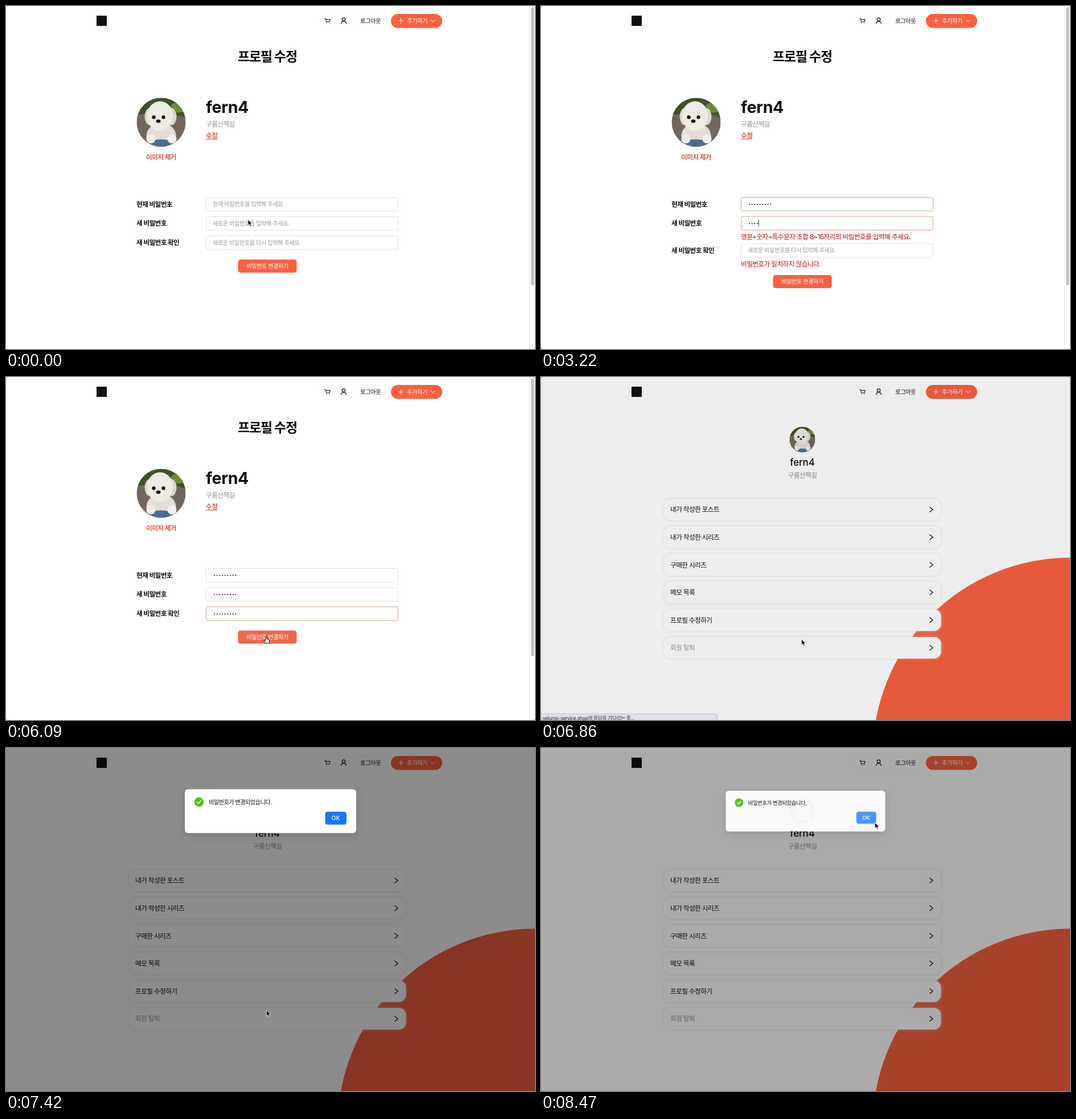
Write an HTML page that moves like this. It is 929x603 px and loops after 8540 ms.

```html
<!DOCTYPE html>
<html lang="ko">
<head>
<meta charset="utf-8">
<title>프로필 수정</title>
<style>
  html, body { margin: 0; width: 100%; height: 100%; overflow: hidden; background: #fff; }
  svg { display: block; width: 100%; height: 100%; }
  text { font-family: Inter, "Noto Sans CJK KR", "Noto Sans CJK", sans-serif; letter-spacing: -.05em; white-space: pre; }
  .latin { letter-spacing: -.01em; }
  .line { fill: none; stroke: #111; stroke-linecap: round; stroke-linejoin: round; }
  .soft { fill: #fff; stroke: #000; stroke-opacity: .035; }
</style>
</head>
<body>
<svg viewBox="0 0 929 603">
  <defs>
    <clipPath id="round"><circle r="43"/></clipPath>
    <filter id="halo" x="-5%" y="-30%" width="110%" height="160%">
      <feDropShadow dx="0" dy="0" stdDeviation="2.4" flood-color="#d6d6d6" flood-opacity=".75"/>
    </filter>
    <filter id="lift" x="-15%" y="-50%" width="130%" height="220%">
      <feDropShadow dx="0" dy="5" stdDeviation="8" flood-opacity=".13"/>
    </filter>
    <g id="avatar" clip-path="url(#round)">
      <rect x="-43" y="-43" width="86" height="86" fill="#71675f"/>
      <path d="M-43-43h86V-8Q0-24-43-12z" fill="#3f5228"/>
      <ellipse cx="30" cy="-26" rx="14" ry="9" fill="#6f8a3c"/>
      <ellipse cy="24" rx="26" ry="23" fill="#e3ddd6"/>
      <ellipse cx="-20" cy="-10" rx="9" ry="15" fill="#ddd5cc"/>
      <ellipse cx="18" cy="-10" rx="9" ry="15" fill="#ddd5cc"/>
      <ellipse cx="-2" cy="-11" rx="23" ry="26" fill="#eeeae4"/>
      <circle cx="-13" cy="-9" r="3.2" fill="#1c1917"/>
      <circle cx="4" cy="-9" r="3.2" fill="#1c1917"/>
      <ellipse cx="-5" cy="-2" rx="4" ry="3" fill="#1c1917"/>
      <ellipse cx="-1" cy="42" rx="31" ry="12" fill="#4d6c93"/>
      <circle cx="-18" cy="29" r="8" fill="#f1ede8"/>
      <circle cx="19" cy="29" r="8" fill="#f1ede8"/>
    </g>
  </defs>

  <rect width="929" height="603" fill="#fff"/>
  <g id="edit"></g>
  <g id="menu"></g>
  <g id="header"></g>
  <rect id="mask" width="929" height="603"/>
  <g id="modal"></g>
  <g id="status"></g>
  <path d="M0 0h929v603H0zM2.500A2.5 2.5 0 0 0 0 2.5" fill="none"/>
  <path d="M0 0h2Q0 0 0 2zM929 0v2q0-2-2-2zM929 603h-2q2 0 2-2zM0 603v-2q0 2 2 2z" fill="#444"/>
  <g id="cursor">
    <path id="arrow" d="M0 0v10.200l2.400-2.100 1.700 4 1.800-.8-1.700-3.900h3.100z" fill="#000" stroke="#fff" stroke-width=".8"/>
    <path id="beam" class="line" d="M-2-5.500q2 0 2 1.500v8q0 1.500-2 1.500M2-5.500q-2 0-2 1.500M2 5.500q-2 0-2-1.500" stroke-width=".9"/>
    <path id="hand" d="M-1.500-4c0-1.500 2-1.500 2 0v3.500l3 .6q1.700.4 1.500 2.200L4.300 7H-1.600L-4.300 2.800q-.6-1.400.8-1.400l2 1.400z" fill="#fff" stroke="#000" stroke-width=".9" stroke-linejoin="round"/>
  </g>
</svg>

<script>
const LOOP = 8540, STEP = 70;
const ORANGE = '#f9603f', LINK = '#dc573b', ACTIVE = '#e8998c', IDLE = '#dedede';
const $ = id => document.getElementById(id);

// Text placed by its vertical centre
const text = (x, cy, size, str, o = {}) =>
  `<text x="${x}" y="${cy + size * .37}" font-size="${size}" fill="${o.fill || '#0c0c0c'}" font-weight="${o.weight || 400}"
    text-anchor="${o.anchor || 'start'}" class="${o.cls || ''}" ${o.extra || ''}>${str}</text>`;
const box = (x, y, w, h, r, attrs) =>
  `<rect x="${x}" y="${y}" width="${w}" height="${h}" rx="${r}" ${attrs}/>`;
const mid = { anchor: 'middle' };

$('header').innerHTML =
  '<rect x="159" y="17" width="18" height="18" fill="#111"/>' +
  '<circle cx="564" cy="26" r="12" class="soft"/><circle cx="593" cy="26" r="12" class="soft"/>' +
  box(610.5, 14, 59.5, 24, 12, 'class="soft"') +
  `<path class="line" stroke-width="1.100" d="M559.500 22h1.700l1.400 6h5.400l1.200-4.500h-7M563 30.300h.1M567.700 30.300h.1"/>
   <circle class="line" stroke-width="1.200" cx="593" cy="23.600" r="2.700"/>
   <path class="line" stroke-width="1.200" d="M588.500 31c.5-5.500 8.500-5.500 9 0"/>` +
  text(622, 26, 10.4, '로그아웃') +
  box(676, 14, 90, 24.5, 12.2, `fill="${ORANGE}"`) +
  '<path class="line" style="stroke:#fff" d="M689.500 26h8M693.500 22v8M746 24.300l3.700 3.700 3.700-3.700"/>' +
  text(704, 26, 10.4, '추가하기', { fill: '#fff', weight: 500 });

const rows = [
  { label: '현재 비밀번호', hint: '현재 비밀번호를 입력해 주세요.', y: 348.3 },
  { label: '새 비밀번호', hint: '새로운 비밀번호를 입력해 주세요.', y: 382 },
  { label: '새 비밀번호 확인', hint: '새로운 비밀번호를 다시 입력해 주세요.', y: 416 }
];
const field = (r, i) => `<g id="row${i}">` +
  text(229, r.y, 11.65, r.label, { weight: 700 }) +
  box(351.5, r.y - 12, 337, 24, 3.5, `id="box${i}" fill="#fff"`) +
  text(363, r.y, 10.25, r.hint, { fill: '#9b9b9b', extra: `id="hint${i}"` }) +
  `<path id="dots${i}" fill="none" stroke="#111" stroke-width="2" stroke-linecap="round" stroke-dasharray="0 4.650"/>
   <path id="caret${i}" stroke="#111" stroke-width=".9"/></g>`;

$('edit').innerHTML =
  text(459, 89, 22.9, '프로필 수정', { ...mid, weight: 700 }) +
  '<use href="#avatar" x="272.500" y="204.500"/>' +
  text(272.5, 266, 11.65, '이미지 제거', { ...mid, fill: LINK, weight: 700 }) +
  text(351, 177.5, 28.5, 'fern4', { weight: 700, cls: 'latin' }) +
  text(351, 208, 11.65, '구름산책길', { fill: '#8f8f8f' }) +
  text(351, 228, 11.65, '수정', { fill: LINK, weight: 700, extra: 'text-decoration="underline"' }) +
  rows.map(field).join('') +
  text(351, 405.7, 11.65, '영문+숫자+특수문자 조합 8~16자리의 비밀번호를 입력해 주세요.', { fill: '#c40808', extra: 'id="badFormat"' }) +
  text(351, 440, 11.65, '비밀번호가 일치하지 않습니다.', { fill: '#c40808', extra: 'id="mismatch"' }) +
  '<g id="submit">' + box(407.5, 445.7, 103, 23, 4.5, 'id="submitBox"') +
  text(459, 457, 10.2, '비밀번호 변경하기', { ...mid, fill: '#fff', weight: 500 }) + '</g>' +
  '<path d="M919.500 0v603" stroke="#e9e9e9"/>' + box(922, 2, 5.5, 489, 2.75, 'fill="#c1c1c1"');

const items = ['내가 작성한 포스트', '내가 작성한 시리즈', '구매한 시리즈', '메모 목록', '프로필 수정하기', '회원 탈퇴'];
$('menu').innerHTML =
  `<circle cx="930" cy="665" r="347.500" fill="${ORANGE}"/>` +
  '<use href="#avatar" transform="translate(459 110) scale(.525)"/>' +
  text(459, 149.7, 17, 'fern4', { ...mid, weight: 500, cls: 'latin' }) +
  text(459, 173, 11.65, '구름산책길', { ...mid, fill: '#8f8f8f' }) +
  items.map((name, i) => {
    const y = 233 + i * 48.6;
    return box(215.5, y - 19, 487, 38, 12.5, 'fill="#fff" filter="url(#halo)"') +
      text(227, y, 11.65, name, { weight: 500, fill: i === 5 ? '#969696' : '#0c0c0c' }) +
      `<path class="line" stroke-width="1.300" d="M682.800 ${y - 4.3}l5.400 4.300-5.400 4.300"/>`;
  }).join('');

$('modal').innerHTML =
  box(314, 72.5, 301, 77, 6, 'fill="#fff" filter="url(#lift)"') +
  '<circle cx="339" cy="95" r="8.200" fill="#52c41a"/>' +
  '<path class="line" style="stroke:#fff" stroke-width="1.500" d="M335.800 95.200l2.300 2.400 4-5"/>' +
  text(356, 95, 10.15, '비밀번호가 변경되었습니다.') +
  box(560.5, 112, 37.5, 22.8, 4.4, 'id="ok"') +
  text(579, 123.3, 10.3, 'OK', { ...mid, fill: '#fff', weight: 500, cls: 'latin' });

$('status').innerHTML =
  box(-5, 592, 314, 20, 2.5, 'fill="#dfe1ea" stroke="#aaa" stroke-opacity=".7" stroke-width=".8"') +
  text(3, 600, 8.8, 'velumo-service.shop의 응답을 기다리는 중...', { fill: '#333' });

// Character count over time, per field: [time, count]
const typed = [
  [[840, 0], ...Array.from({ length: 9 }, (_, i) => [910 + i * STEP, i + 1])],
  [[1680, 0], [1750, 1], [1820, 2], [1890, 3], [1960, 4], [2030, 5], [2100, 6], [2380, 7], [2450, 8], [2520, 9],
   [3010, 7], [3080, 6], [3220, 4], [3430, 5], [3500, 7], [3640, 8], [3710, 9]],
  [[4130, 0], [4200, 1], [4340, 2], [4480, 3], [4620, 4], [4760, 5], [4900, 6], [5110, 7], [5180, 8], [5320, 9]]
];
const maskTrack = [[6790, 0], [6860, .07], [6930, .23], [7000, .37], [7140, .43], [7280, .45], [8260, .45], [8330, .44], [8400, .4], [8470, .33]];
const scaleTrack = [[6860, .2], [6930, .8], [7000, .956], [7070, 1], [8330, 1], [8400, .98], [8470, .93]];
const fadeTrack = [[6860, 0], [6930, .6], [7000, .95], [7070, 1], [8330, 1], [8470, .95]];

const smooth = k => k * k * (3 - 2 * k);
const same = k => k;
function at(track, t, ease = same) {
  const n = track.findIndex(p => p[0] > t);
  if (n < 0) return track[track.length - 1][1];
  if (n === 0) return track[0][1];
  const [t0, a] = track[n - 1], [t1, b] = track[n];
  return a + (b - a) * ease((t - t0) / (t1 - t0));
}
const lastKey = (keys, t) => keys.filter(k => k[0] <= t).pop();
const show = (id, on) => $(id).setAttribute('display', on ? 'inline' : 'none');
const shift = (id, y) => $(id).setAttribute('transform', `translate(0 ${y})`);

const xTrack = [[0, 425], [490, 432], [630, 432], [700, 433], [5530, 433], [6020, 457.5], [7420, 457.5], [8260, 586.5]];
const yTrack = [[0, 375.5], [490, 357], [630, 357], [700, 356], [5530, 356], [6020, 461], [7420, 461], [8260, 131]];

function drawForm(t, pointerY) {
  const focus = t < 840 ? -1 : t < 1680 ? 0 : t < 4130 ? 1 : 2;
  const counts = typed.map(keys => (lastKey(keys, t) || [0, 0])[1]);
  rows.forEach((r, i) => {
    const n = counts[i], x = 363.7 + n * 4.65;
    const hover = t > 0 && Math.abs(pointerY - r.y) < 12;
    $('box' + i).setAttribute('stroke', focus === i || hover ? ACTIVE : IDLE);
    show('hint' + i, !n);
    show('dots' + i, n);
    $('dots' + i).setAttribute('d', `M366 ${r.y + .5}h${Math.max(0, n - 1) * 4.65 + .1}`);
    $('caret' + i).setAttribute('d', `M${x} ${r.y - 5.5}v11`);
    show('caret' + i, focus === i && (t - lastKey(typed[i], t)[0]) % 1000 < 500);
  });
  const badFormat = counts[1] > 0 && counts[1] < 8;
  const mismatch = t >= 2450 && t < 5320;
  const down = badFormat ? 13.7 : 0;
  show('badFormat', badFormat);
  show('mismatch', mismatch);
  shift('row2', down);
  shift('mismatch', down);
  shift('submit', down + (mismatch ? 13.7 : 0));
  $('submitBox').setAttribute('fill', pointerY > 446 ? '#ee684d' : ORANGE);
}

function drawCursor(t, x, y, editing) {
  const overField = editing && t > 0 && rows.some(r => Math.abs(y - r.y) < 12);
  const overButton = editing && y > 446;
  $('cursor').setAttribute('transform', `translate(${x} ${y})`);
  show('cursor', t < 840 || t >= 5600);
  show('beam', overField);
  show('hand', overButton);
  show('arrow', !overField && !overButton);
}

function render(t) {
  const editing = t < 6510;
  const x = at(xTrack, t, smooth), y = at(yTrack, t, smooth);
  show('edit', editing);
  show('menu', !editing);
  if (editing) drawForm(t, y);
  drawCursor(t, x, y, editing);

  $('mask').setAttribute('opacity', at(maskTrack, t));
  const fade = at(fadeTrack, t), s = at(scaleTrack, t);
  show('modal', fade > 0);
  $('modal').setAttribute('opacity', fade);
  $('modal').setAttribute('transform', `translate(464.5 111) scale(${s}) translate(-464.5 -111)`);
  $('ok').setAttribute('fill', t >= 8190 ? '#4096ff' : '#1677ff');
  $('ok').setAttribute('stroke', t >= 8330 ? '#a9cdfb' : 'none');
  show('status', t >= 6580 && t < 7280);
}

const start = performance.now();
function tick() {
  const t = (performance.now() - start) % LOOP;
  render(Math.floor(t / STEP) * STEP);
  requestAnimationFrame(tick);
}
tick();
</script>
</body>
</html>
```
